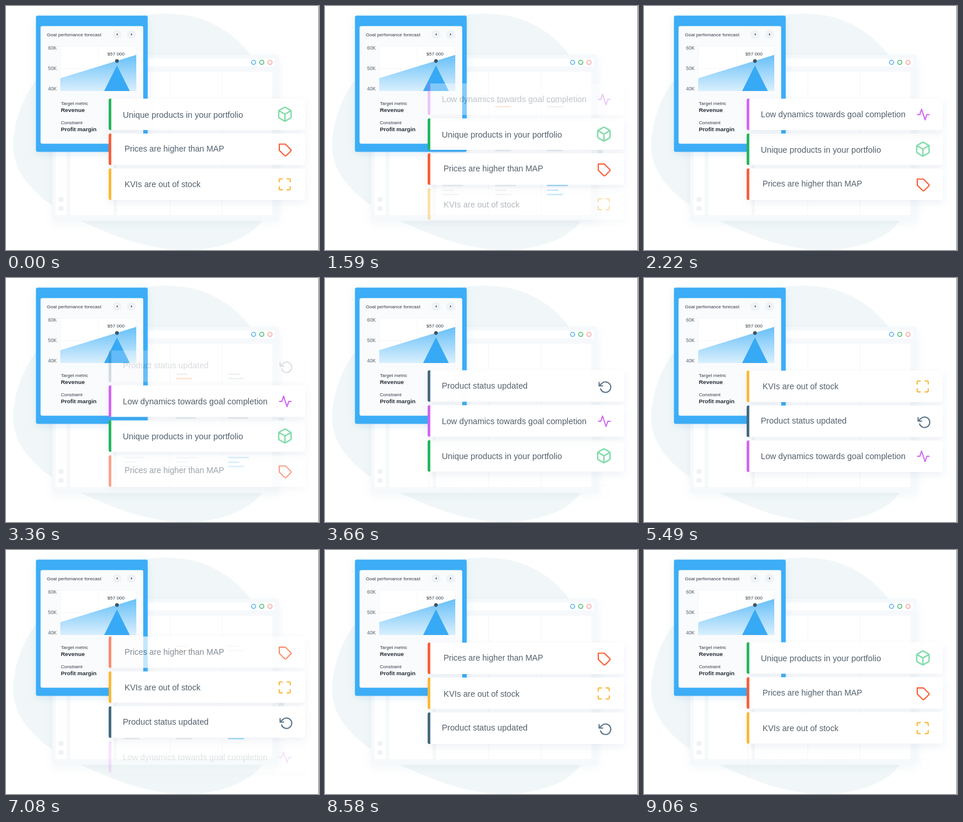
Animation, 536 px wide and 419 px high, one loop 9090 ms. Source, as an HTML page:

```html
<!DOCTYPE html>
<html lang="en">
<head>
<meta charset="utf-8">
<title>Goal forecast</title>
<style>
  html, body { margin: 0; width: 100%; height: 100%; overflow: hidden; background: #fff; }
  svg { display: block; width: 536px; height: 419px; }
  text { font-family: "Liberation Sans", Arial, sans-serif; font-size: 8.1px; fill: #2f3a44; }
  .axis text { font-size: 8.4px; fill: #56616b; }
  .bold { font-size: 9.8px; font-weight: bold; fill: #232c35; }
  .window { filter: drop-shadow(0 4px 8px rgba(70, 120, 160, .07)); }
  .panel { filter: drop-shadow(0 4px 7px rgba(60, 140, 200, .14)); }
  .grid { fill: #fff; stroke: #e9eef3; stroke-width: .8; stroke-dasharray: 3 2; }
  .card { filter: drop-shadow(0 5px 7px rgba(70, 100, 140, .09)); }
  .card text { fill: #53616d; }
  .icon { fill: none; stroke-width: 2; stroke-linecap: round; stroke-linejoin: round; }
</style>
</head>
<body>
<svg viewBox="0 0 536 419">
  <defs>
    <linearGradient id="area" x1="0" y1="0" x2="0" y2="1">
      <stop offset="0" stop-color="#66bff8"/>
      <stop offset="1" stop-color="#d9effd"/>
    </linearGradient>
  </defs>

  <path fill="#f1f7f8" d="M275 13C345 13 393 48 420 86L438 369C415 402 360 419 310 419C235 419 175 390 128 369C90 352 13 310 12 240C13 200 27 160 51 128C115 45 200 13 275 13Z"/>

  <g class="window">
    <rect x="79" y="84" width="388" height="285" rx="3" fill="#f6f9fb"/>
  </g>
  <g fill="#fff">
    <rect x="85" y="90" width="375" height="14" rx="1"/>
    <rect x="85" y="113" width="19" height="246" rx="2"/>
    <rect x="110" y="113" width="74" height="246"/>
    <rect x="190" y="113" width="266" height="246"/>
  </g>
  <path d="M280.5 113V359M370.5 113V359" stroke="#f3f6f9"/>
  <g fill="#edf3f5">
    <rect x="90" y="328" width="8.5" height="8" rx="2"/>
    <rect x="90" y="343.5" width="8.5" height="8" rx="2"/>
  </g>
  <rect x="467" y="240" width="9" height="28" rx="2" fill="#e9eef1"/>
  <g fill="#fff" stroke-width="1.3">
    <circle cx="424" cy="96.7" r="3.6" stroke="#44aef0"/>
    <circle cx="438" cy="96.7" r="3.6" stroke="#35b566"/>
    <circle cx="452" cy="96.7" r="3.6" stroke="#f59a92"/>
  </g>
  <g id="lines"></g>

  <g class="panel">
    <rect x="51.3" y="16.4" width="191.4" height="234" rx="3" fill="#3cadf6"/>
  </g>
  <rect x="59.2" y="34.4" width="175.8" height="202" rx="3" fill="#fafbfd"/>
  <text x="70" y="51.6">Goal perfomance forecast</text>
  <g fill="#eff3f5">
    <circle cx="190" cy="48.7" r="7.7"/>
    <circle cx="215" cy="48.7" r="7.7"/>
  </g>
  <path d="M191.2 47V50.4L189 48.7ZM214.2 47V50.4L216.4 48.7Z" fill="#26303a"/>

  <g class="axis">
    <text x="72" y="74.5">60K</text>
    <text x="72" y="109.6">50K</text>
    <text x="72" y="145.4">40K</text>
  </g>
  <path class="grid" d="M93 146V69H223V146"/>
  <path class="grid" d="M93 107.5H223M158 69V146"/>
  <path d="M93 124L223 84V146H93Z" fill="url(#area)"/>
  <path d="M190 102L212 146H168Z" fill="#38a9f5"/>
  <circle cx="190" cy="94.4" r="3.1" fill="#43525f"/>
  <text x="188.3" y="85.2" text-anchor="middle">$57 000</text>

  <text x="94" y="170.2">Target metric</text>
  <text class="bold" x="94" y="182.2">Revenue</text>
  <text x="94" y="203">Constraint</text>
  <text class="bold" x="94" y="215">Profit margin</text>

  <g id="cards"></g>
  <rect x="535" width="1" height="419" fill="#858585"/>
</svg>

<script>
const NS = "http://www.w3.org/2000/svg";
const LOOP = 9090, FIRST = 1440, STEP = 1800, MOVE = 480;
const TOP = 159, PITCH = 60;

function add(parent, name, attrs, text) {
  const el = document.createElementNS(NS, name);
  for (const key in attrs) el.setAttribute(key, attrs[key]);
  if (text) el.textContent = text;
  return parent.appendChild(el);
}

// Table content behind the cards: [y, width]
const rows = [[164, 20], [171.5, 28], [239, 34], [247, 28], [307, 36], [315, 20], [322.5, 28]];
const lines = document.getElementById("lines");
[201, 291, 380].forEach((x, col) => rows.forEach(([y, width], row) => {
  let fill = "#e8edf1";
  if (col === 1 && row === 1) fill = "#ffdcc4";
  if (col === 2 && row > 3) fill = "#a4d9fb";
  add(lines, "rect", { x, y, width, height: 2.4, rx: 1.2, fill });
}));

// Cards from the top slot down; at is the icon centre, relative to the card top
const cards = [
  { text: "Unique products in your portfolio", x: 200, y: 32.7, size: 14.3,
    bar: "#1fb55b", ink: "#7fdca8", at: [477.6, 26.8], scale: 1.18,
    icon: "M21 16V8a2 2 0 0 0-1-1.73l-7-4a2 2 0 0 0-2 0l-7 4A2 2 0 0 0 3 8v8a2 2 0 0 0 1 1.73l7 4a2 2 0 0 0 2 0l7-4A2 2 0 0 0 21 16zM3.27 6.96L12 12.01l8.73-5.05M12 22.08V12" },
  { text: "Prices are higher than MAP", x: 203, y: 31, size: 13.95,
    bar: "#fb5b35", ink: "#fa6239", at: [478.5, 28.8], scale: 1.05,
    icon: "M20.59 13.41l-7.17 7.17a2 2 0 0 1-2.83 0L2 12V2h10l8.59 8.59a2 2 0 0 1 0 2.82z" },
  { text: "KVIs are out of stock", x: 203, y: 32.5, size: 14.1,
    bar: "#fcb731", ink: "#fbb93c", at: [477.3, 27.3], scale: 1.05,
    icon: "M8 3H5a2 2 0 0 0-2 2v3m18 0V5a2 2 0 0 0-2-2h-3m0 18h3a2 2 0 0 0 2-2v-3M3 16v3a2 2 0 0 0 2 2h3" },
  { text: "Product status updated", x: 200, y: 31, size: 14.3,
    bar: "#40677d", ink: "#5b7488", at: [480.4, 28.8], scale: 1,
    icon: "M1 4v6h6M3.51 15a9 9 0 1 0 2.13-9.36L1 10" },
  { text: "Low dynamics towards goal completion", x: 200, y: 32.2, size: 14.26,
    bar: "#d063f2", ink: "#d268f0", at: [478.3, 27.4], scale: 1,
    icon: "M22 12h-4l-3 9L9 3l-3 9H2" }
];

const layer = document.getElementById("cards");
for (const card of cards) {
  const g = card.el = add(layer, "g", { class: "card" });
  add(g, "rect", { x: 177, width: 335, height: 54, rx: 3, fill: "#fff" });
  add(g, "path", { d: "M180.3 0V54H178.5Q175.8 54 175.8 51V3Q175.8 0 178.5 0Z", fill: card.bar });
  add(g, "text", { x: card.x, y: card.y, style: `font-size:${card.size}px` }, card.text);
  add(g, "path", {
    class: "icon", d: card.icon, stroke: card.ink,
    transform: `translate(${card.at}) scale(${card.scale}) translate(-12 -12)`
  });
}

// cubic-bezier(.275, 0, .146, 1)
function ease(x) {
  if (x >= 1) return 1;
  let lo = 0, hi = 1;
  for (let i = 0; i < 24; i++) {
    const t = (lo + hi) / 2, r = 1 - t;
    if (3 * r * r * t * .275 + 3 * r * t * t * .146 + t ** 3 < x) lo = t;
    else hi = t;
  }
  return lo * lo * (3 - 2 * lo);
}

function fade(slot) {
  if (slot < 0) return (slot + 1) ** 1.8;
  return Math.max(0, Math.min(1, 3 - slot));
}

function draw(time) {
  const t = (time - FIRST + LOOP) % LOOP;
  const step = Math.min(4, Math.floor(t / STEP));
  const shift = step + ease((t - step * STEP) / MOVE);
  cards.forEach((card, i) => {
    const slot = (i + shift + 1) % 5 - 1;
    card.el.setAttribute("transform", `translate(0 ${TOP + slot * PITCH})`);
    card.el.setAttribute("opacity", fade(slot));
  });
}

const start = performance.now();
function tick() {
  draw((performance.now() - start) % LOOP);
  requestAnimationFrame(tick);
}
tick();
</script>
</body>
</html>
```
